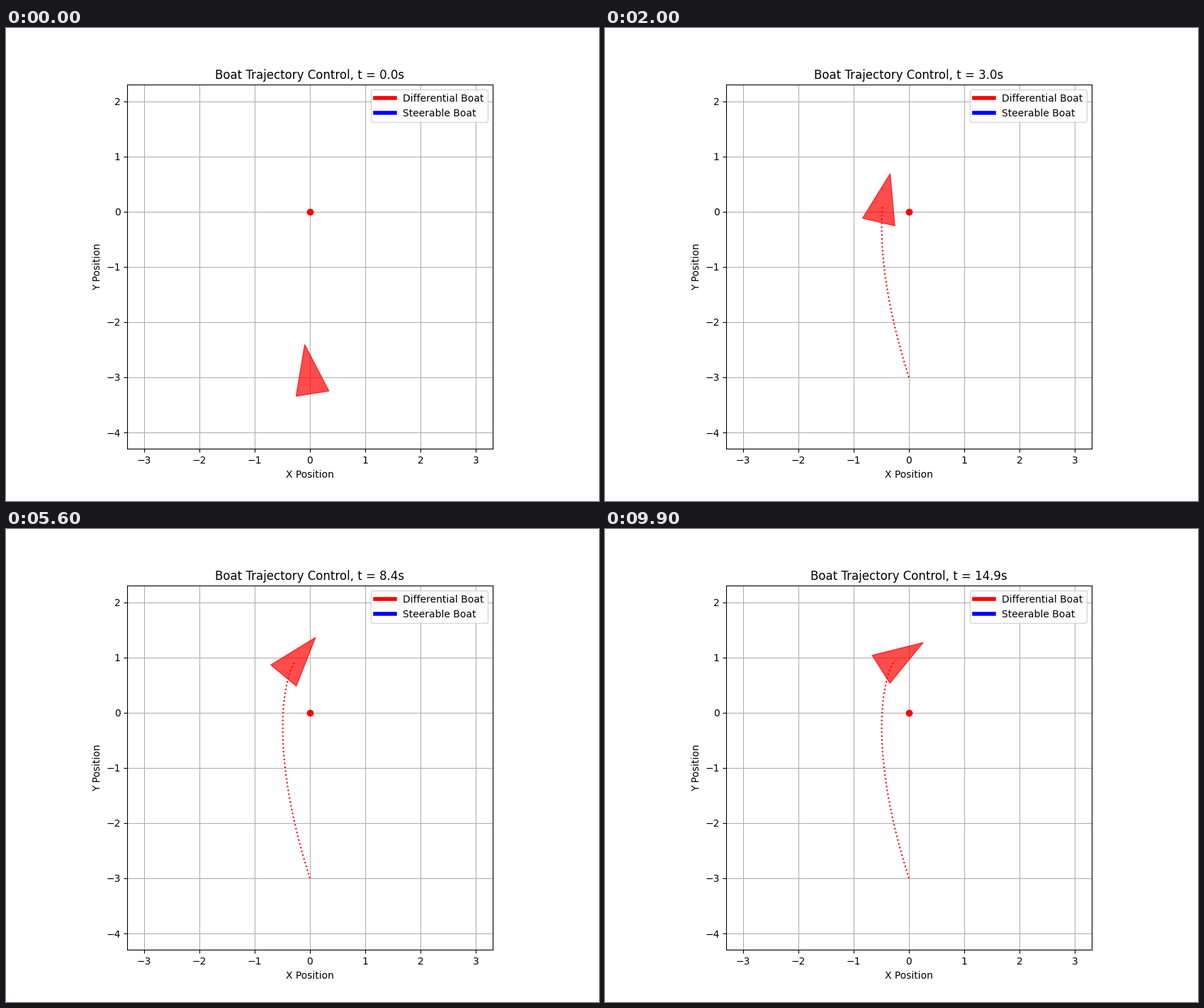
Recreate the animation shown at these times as a matplotlib script. Size 837 by 669 pixels, loop 10000 ms.

```python
import numpy as np
import matplotlib.pyplot as plt
from matplotlib.animation import FuncAnimation
from matplotlib.lines import Line2D
from matplotlib.patches import Polygon

DT = 0.05
STRIDE = 3
FRAMES = 100
HULL = np.array([[0.6, 0.0], [-0.3, -0.3], [-0.3, 0.3]])


def rotation(angle):
    c, s = np.cos(angle), np.sin(angle)
    return np.array([[c, -s], [s, c]])


def simulate(steps):
    """Coasting boat: linear drag on surge, sway and yaw rate."""
    pos = np.array([0.0, -3.0])
    heading = np.pi / 2 + np.pi / 20
    vel = np.array([2.0, 0.3])
    yaw_rate = -0.15
    path, headings = [], []
    for _ in range(steps):
        path.append(pos)
        headings.append(heading)
        pos = pos + rotation(heading) @ vel * DT
        heading += yaw_rate * DT
        vel = vel * (1 - 0.5 * DT)
        yaw_rate *= 1 - 0.1 * DT
    return np.array(path), np.array(headings)


path, headings = simulate(FRAMES * STRIDE)

# The small margin keeps the pixel size from being truncated down.
fig, ax = plt.subplots(figsize=(8.3701, 6.6901), dpi=100)
ax.set_aspect("equal")
ax.set_xlim(-3.3, 3.3)
ax.set_ylim(-4.3, 2.3)
ax.set_xticks(range(-3, 4))
ax.set_yticks(range(-4, 3))
ax.set_xlabel("X Position")
ax.set_ylabel("Y Position")
ax.grid(True)
ax.legend(
    handles=[
        Line2D([0], [0], color="red", lw=4, label="Differential Boat"),
        Line2D([0], [0], color="blue", lw=4, label="Steerable Boat"),
    ],
    loc="upper right",
)

ax.plot(0, 0, "ro")
trail, = ax.plot([], [], "r:")
boat = Polygon(HULL, closed=True, color="red", alpha=0.7, zorder=2)
ax.add_patch(boat)
title = ax.set_title("")


def update(frame):
    k = frame * STRIDE
    trail.set_data(path[: k + 1, 0], path[: k + 1, 1])
    boat.set_xy(HULL @ rotation(headings[k]).T + path[k])
    title.set_text(f"Boat Trajectory Control, t = {k * DT:.1f}s")
    return trail, boat, title


anim = FuncAnimation(fig, update, frames=FRAMES, interval=100, repeat=True,
                     repeat_delay=0, blit=False)
plt.show()
```
